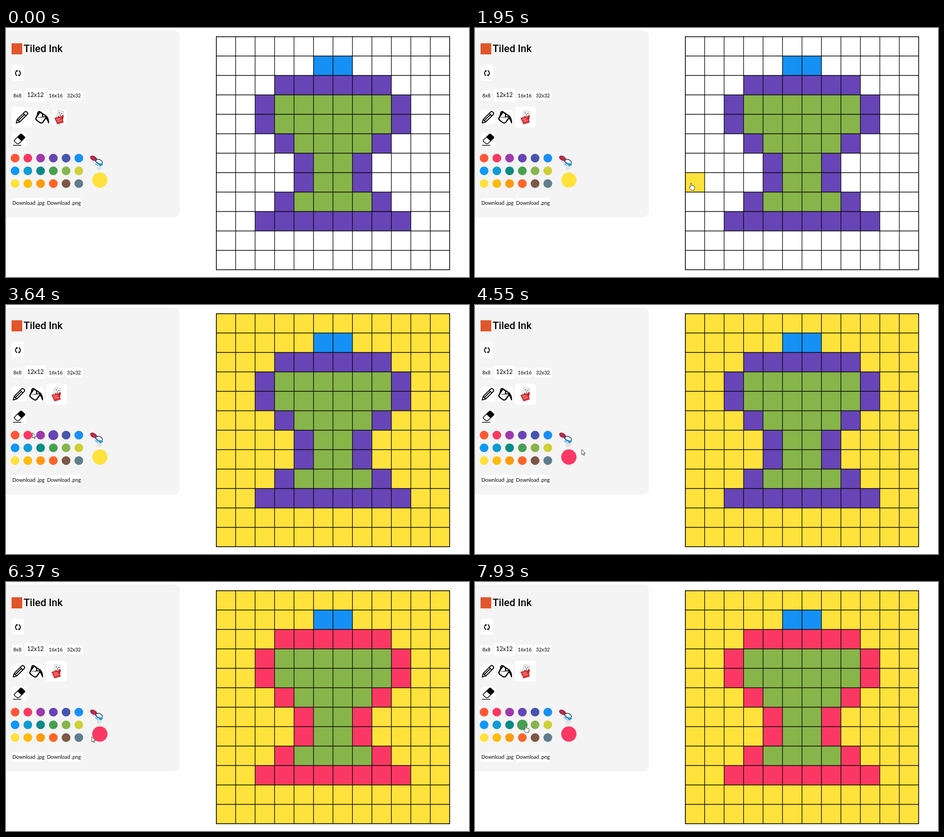
An HTML page that plays this animation: 999 by 538 pixels, repeating every 8060 ms.

```html
<!DOCTYPE html>
<html lang="en">
<head>
<meta charset="utf-8">
<title>Tiled Ink</title>
<style>
  html, body { margin: 0; width: 100%; height: 100%; overflow: hidden; background: #fefefe; }
  svg { display: block; width: 100%; height: 100%; }
  text { font: 11px Lato, sans-serif; text-anchor: middle; fill: #000; }
  .title { font: 500 22px Roboto, sans-serif; text-anchor: start; }
  .size { font-size: 10.7px; }
  .big { font-size: 12.7px; }
  .button { fill: #fff; }
  .line { fill: none; stroke: #000; stroke-width: 2; stroke-linejoin: round; stroke-linecap: round; }
</style>
</head>
<body>
<svg viewBox="0 0 999 538">
  <rect x="-14" y="5.5" width="389" height="403.5" rx="13" fill="#f4f4f4"/>
  <rect x="12" y="33" width="23" height="24" fill="#e0562a"/>
  <text class="title" x="38" y="52">Tiled Ink</text>

  <g id="labels"></g>

  <path class="line" d="M23.3 92.3Q17.5 97.5 23.3 102.7M28.2 92.3Q34 97.5 28.2 102.7"/>
  <path d="M21 91.5h4v4zM30.500 103.500h-4v-4z"/>

  <g id="pencil">
    <rect class="button" rx="6"/>
    <g class="line">
      <path d="M-12.500 12.500L-10.300 4.800L5.800-11.300Q8-13.300 10.200-11.300L11.500-10Q13.300-8 11.500-6L-4.800 10.300ZM-10.300 4.800L-4.800 10.300M2.800-8.300L8.500-2.700M-7 6.500L4.500-5"/>
    </g>
  </g>
  <g id="bucket">
    <rect class="button" rx="6"/>
    <path class="line" stroke-width="2.4" style="stroke-width:2.5" d="M-4.500-11.500L10-1.500L1 11.500Q-2 13.500-5 11.500L-12 6.500Q-14.500 4-13 1ZM-11.500-1L-9-10.500Q-8-13-5-12L1-7V-2"/>
    <path d="M-13 1.500L8-2.500L10-1.500L6 0ZM8-4Q15 0 15 12Q15 14 13 13Q11 6 7 2Z"/>
  </g>
  <g id="cards">
    <rect class="button" rx="6"/>
    <g transform="rotate(12)">
      <rect x="-6" y="-13.500" width="13" height="17" rx="1" fill="#fafafa" stroke="#999" stroke-width=".7"/>
      <path d="M-3-10h2v2h-2zM2.500-10h2v2h-2zM0-6h2v2h-2zM-3-2.500h2v2h-2z" fill="#333"/>
      <path d="M5-6l4 1v14l-5 3z" fill="#c5262b"/>
    </g>
    <path d="M-10 2L4-2L9 11L-4 15Z" fill="#e0383a" stroke="#b41f28"/>
    <path d="M-6 5L2 3M-4 9L5 6.500" stroke="#f5a3a0" stroke-width="1.500"/>
  </g>

  <g transform="translate(29 240)">
    <path d="M-11 2.500L2-10.500Q3.500-11.500 5-10.300L11-5Q12.500-3.500 11-2L-1.500 10H-5L-11 5Q-12 4 -11 2.500Z" fill="#fff" stroke="#000" stroke-width="1.600"/>
    <path d="M-4.500-4L2-10.500Q3.500-11.500 5-10.300L11-5Q12.500-3.500 11-2L4.500 4.500Z"/>
    <path d="M-14 13.500H4" stroke="#000" stroke-width="1.500"/>
  </g>

  <g transform="translate(196 290)">
    <path d="M-12-4L0 7V16Q6 19 11 13L10 4Z" fill="#dfe3e6"/>
    <path d="M-14-9L-2-1L-4 3L-13-2Z" fill="#e9e5e8"/>
    <ellipse cx="-7" cy="-8.500" rx="7.500" ry="4.300" transform="rotate(28 -7 -8.500)" fill="#c72642" stroke="#6b2340"/>
    <path d="M-6-5L1-1" stroke="#8b36a0" stroke-width="3"/>
    <ellipse cx="5" cy="-1" rx="7.500" ry="4.800" transform="rotate(25 5 -1)" fill="#eef4f7" stroke="#243447" stroke-width="1.500"/>
    <path d="M-1-2Q5 4 12 2L13 6L7 9L3 4Z" fill="#2099d2"/>
    <path d="M-5 4Q0 1 4 9L-1 6Z" fill="#55b9e2"/>
  </g>

  <g id="dots"></g>
  <circle id="current" cx="202.500" cy="328.500" r="16.500"/>
  <g id="cells"></g>
  <path id="lines" fill="none" stroke="#000" stroke-width="1.300"/>
  <rect x="453.800" y="18.800" width="503.500" height="503.500" fill="none" stroke="#000" stroke-width="1.600"/>

  <g id="cursor" stroke="#222" stroke-width=".9" stroke-linejoin="round" fill="#fff">
    <path id="arrow" d="M0 0V11.500L2.600 9.200L4.300 13L6 12.300L4.400 8.600H8Z"/>
    <path id="hand" d="M-1 9V1.200a1.200 1.200 0 0 1 2.400 0V5.500l5 1a1.600 1.600 0 0 1 1.400 1.600V11l-1.400 4.500H.6L-3.400 10.200a1.100 1.100 0 0 1 1.600-1.500Z"/>
  </g>
</svg>
<script>
const LOOP = 8060, STEP = 130, CELL = 42, LEFT = 453.5, TOP = 18.5;
const YELLOW = '#ffe23c', PINK = '#fb3864', PURPLE = '#6745b6', GREEN = '#87b54a';
const PALETTE = ['#ff5735', PINK, '#a038ae', PURPLE, '#4656ae', '#1790f3',
  '#0d98f7', '#0d9cd4', '#0a8a86', '#47a04f', GREEN, '#cfcf36',
  YELLOW, '#ffbc0b', '#ff9a0d', '#ff6426', '#7d5847', '#5f7d8c'];
const PICTURE = ['............', '.....bb.....', '...pppppp...', '..pggggggp..',
  '..pggggggp..', '...pggggp...', '....pggp....', '....pggp....',
  '...pggggp...', '..pppppppp..', '............', '............'].join('');

// Pointer moves: start time, number of steps, destination
const MOVES = [
  [390, 3, 121, 181], [1300, 6, 466, 335], [2600, 1, 466, 335],
  [3250, 3, 103, 278], [3640, 1, 57, 276], [4160, 2, 46, 278],
  [4420, 6, 599, 380], [5330, 2, 599, 380], [6370, 1, 185, 334],
  [6500, 5, 20, 334], [7800, 1, 65, 325], [7930, 1, 109, 310]
];

const $ = id => document.getElementById(id);
const set = (el, attrs) => { for (const k in attrs) el.setAttribute(k, attrs[k]); return el; };
const add = (parent, tag, attrs) =>
  parent.appendChild(set(document.createElementNS('http://www.w3.org/2000/svg', tag), attrs));
const progress = (t, from, to) => Math.min(1, Math.max(0, (t - from) / (to - from)));

function button(x, y, w, h, label, kind) {
  add($('labels'), 'rect', { x, y, width: w, height: h, rx: 6, class: 'button' });
  if (label) add($('labels'), 'text', { x: x + w / 2, y: y + h / 2 + 4, class: kind }).textContent = label;
}
button(12, 79, 27, 35);
button(12, 135.5, 25, 21.5, '8x8', 'size');
button(40, 130.5, 47, 29.5, '12x12', 'big');
button(90, 135.5, 34.5, 21.5, '16x16', 'size');
button(127, 135.5, 39, 21.5, '32x32', 'size');
button(12, 226, 32, 31.5);
button(12, 367, 73, 21.5, 'Download .jpg', '');
button(88, 367, 74, 21.5, 'Download .png', '');

const dots = PALETTE.map((fill, i) => {
  const x = 19.6 + 27.5 * (i % 6), y = 281.2 + 27.5 * Math.floor(i / 6);
  return { x, y, el: add($('dots'), 'circle', { cx: x, cy: y, fill }) };
});
const cells = [...PICTURE].map((key, i) => add($('cells'), 'rect', {
  x: LEFT + CELL * (i % 12), y: TOP + CELL * Math.floor(i / 12), width: CELL, height: CELL
}));
let lines = '';
for (let i = 1; i < 12; i++)
  lines += `M${LEFT + CELL * i} ${TOP}v504M${LEFT} ${TOP + CELL * i}h504`;
set($('lines'), { d: lines });

const poses = [{ t: 0 }];
let [px, py] = [260, 300];
for (const [start, steps, x, y] of MOVES) {
  for (let k = 1; k <= steps; k++)
    poses.push({ t: start + (k - 1) * STEP, x: px + (x - px) * k / steps, y: py + (y - py) * k / steps });
  [px, py] = [x, y];
}

const onDot = (p, d) => p && Math.hypot(p.x - d.x, p.y - d.y) < 10;
function cellAt({ x, y }) {
  const col = Math.floor((x - LEFT) / CELL), row = Math.floor((y - TOP) / CELL);
  return col >= 0 && col < 12 && row >= 0 && row < 12 ? row * 12 + col : -1;
}

function layTools(t) {
  const grow = progress(t, 260, 650), shrink = progress(t, 1170, 1560);
  let x = 12;
  for (const [id, w, h] of [['pencil', 45 - 13 * shrink, 45 - 13 * shrink],
                            ['bucket', 34, 32], ['cards', 32 + 13.5 * grow, 32 + 13 * grow]]) {
    set($(id), { transform: `translate(${x + w / 2} 192.7)` });
    set($(id).firstElementChild, { x: -w / 2, y: -h / 2, width: w, height: h });
    x += w + 4;
  }
}

function draw(time) {
  const index = poses.findLastIndex(p => p.t <= time);
  const pose = poses[index], t = pose.t, before = poses[index - 1];
  const color = t >= 4290 ? PINK : YELLOW;
  const fills = { '.': t >= 2600 ? YELLOW : '#fff', p: t >= 5330 ? PINK : PURPLE, g: GREEN, b: '#1590f4' };
  const hovered = cellAt(pose);

  layTools(t);
  set($('current'), { fill: color });
  cells.forEach((el, i) => set(el, { fill: i === hovered ? color : fills[PICTURE[i]] }));
  // A dot stays enlarged for one step after the pointer leaves it
  for (const d of dots) set(d.el, { r: onDot(pose, d) ? 11.3 : onDot(before, d) ? 10.7 : 9.4 });

  const overTools = pose.x > 12 && pose.x < 145 && pose.y > 170 && pose.y < 215;
  const pointing = hovered >= 0 || overTools || dots.some(d => onDot(pose, d));
  set($('cursor'), { visibility: index ? 'visible' : 'hidden', transform: `translate(${pose.x || 0} ${pose.y || 0})` });
  set($('hand'), { display: pointing ? 'inline' : 'none' });
  set($('arrow'), { display: pointing ? 'none' : 'inline' });
}

const begin = performance.now();
function tick() {
  draw((performance.now() - begin) % LOOP);
  requestAnimationFrame(tick);
}
tick();
</script>
</body>
</html>
```
